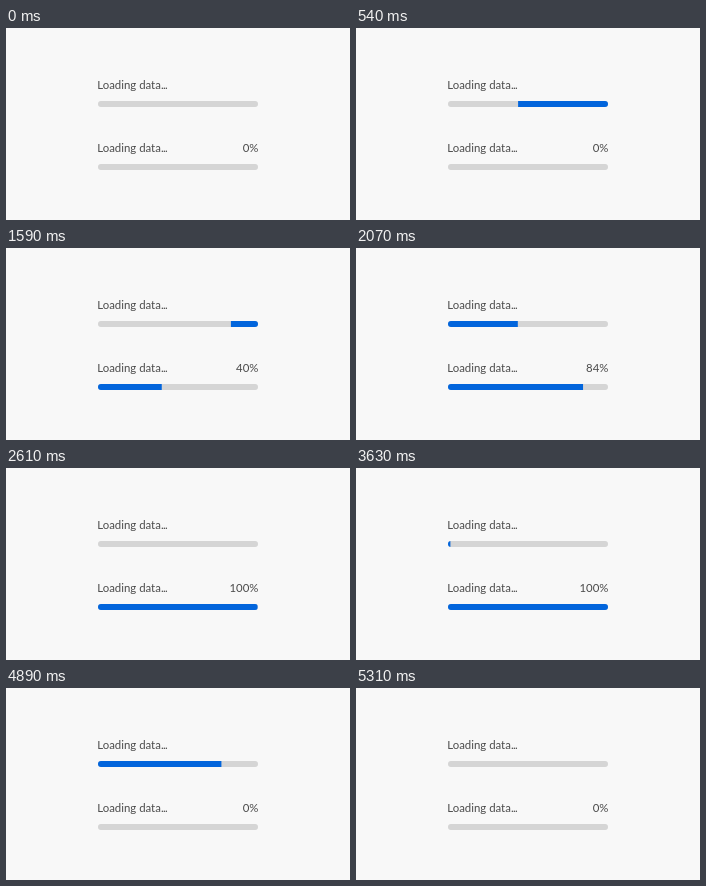
An HTML page for the animation above (5400 ms loop, 344 by 192 pixels).

```html
<!DOCTYPE html>
<html lang="en">
<head>
<meta charset="utf-8">
<title>Progress bars</title>
<style>
  html, body { margin: 0; width: 100%; height: 100%; overflow: hidden; background: #f8f8f8; }
  svg { display: block; width: 100vw; height: 100vh; }
  text { font: 11.4px Lato, "Open Sans", sans-serif; fill: #4b4b4b; }
  .dots { letter-spacing: -0.6px; }
  .track { fill: #d5d5d5; }
  .fill { fill: #0265dc; }
</style>
</head>
<body>
<svg viewBox="0 0 344 192">
  <defs>
    <clipPath id="bar"><rect width="160" height="6" rx="3"/></clipPath>
  </defs>
  <text x="91.3" y="61">Loading data<tspan class="dots">...</tspan></text>
  <g transform="translate(92 73)" clip-path="url(#bar)">
    <rect class="track" width="160" height="6"/>
    <rect class="fill" id="runner" height="6"/>
  </g>
  <text x="91.3" y="124">Loading data<tspan class="dots">...</tspan></text>
  <text id="percent" x="252.4" y="124" text-anchor="end">0%</text>
  <g transform="translate(92 136)" clip-path="url(#bar)">
    <rect class="track" width="160" height="6"/>
    <rect class="fill" id="loaded" height="6"/>
  </g>
</svg>
<script>
  const LOOP = 5400, STEP = 30, TRACK = 160;
  const CYCLE = 900, TRAVEL = 304, RUNNER = 124.5;
  const LOAD_START = 900, LOAD_TIME = 1800, RESET = 4700;

  const [runner, loaded, percent] =
    ["runner", "loaded", "percent"].map(id => document.getElementById(id));

  // Cubic bezier easing, solved by bisection.
  function bezier(x1, y1, x2, y2) {
    const at = (a, b, s) => 3 * a * s * (1 - s) ** 2 + 3 * b * s * s * (1 - s) + s ** 3;
    return u => {
      if (u <= 0) return 0;
      if (u >= 1) return 1;
      let lo = 0, hi = 1;
      for (let i = 0; i < 24; i++) {
        const mid = (lo + hi) / 2;
        if (at(x1, x2, mid) < u) lo = mid; else hi = mid;
      }
      return at(y1, y2, lo);
    };
  }

  const sweep = bezier(0.33, 0.05, 0.67, 0.95);
  const load = bezier(0.42, 0, 0.4, 1);

  function setSpan(rect, from, to) {
    const start = Math.max(0, from);
    rect.setAttribute("x", start);
    rect.setAttribute("width", Math.max(0, Math.min(TRACK, to) - start));
  }

  function draw(t) {
    const head = TRAVEL * sweep((t % CYCLE) / CYCLE);
    setSpan(runner, head - RUNNER, head);

    const done = t < RESET ? load((t - LOAD_START) / LOAD_TIME) : 0;
    setSpan(loaded, 0, TRACK * done);
    percent.textContent = Math.round(done * 100) + "%";
  }

  const began = performance.now();
  function tick() {
    const t = (performance.now() - began) % LOOP;
    draw(Math.floor(t / STEP) * STEP);
    requestAnimationFrame(tick);
  }
  tick();
</script>
</body>
</html>
```
